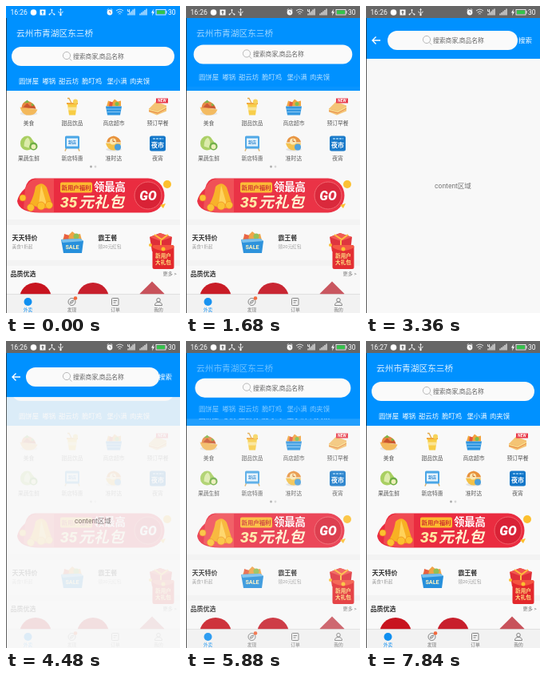
These frames come from a looping animation (218x384 px, 8 s). An HTML page:

```html
<!DOCTYPE html>
<html lang="zh-CN">
<head>
<meta charset="utf-8">
<title>Search transition</title>
<style>
  html, body { margin: 0; width: 100%; height: 100%; overflow: hidden; background: #fff; }
  svg { display: block; width: 100vw; height: 100vh; --p: 0; }
  text { font-family: Roboto, "Noto Sans CJK SC", "Noto Sans CJK", sans-serif; }
  .veil { opacity: calc(1.11 * var(--p) - .11); }
  .bar { height: calc(106px - 40px * var(--p)); }
  .title { opacity: calc(.88 - 2 * var(--p)); }
  .words { opacity: calc(.95 - 2 * var(--p)); transform: translateY(calc(-40px * var(--p))); }
  .lift { transform: translateY(calc(-20px * var(--p))); }
  .box { x: calc(7px + 20px * var(--p)); width: calc(204px - 41px * var(--p)); }
  .back { opacity: calc(2 * var(--p) - .6); }
  .go { opacity: calc(2 * var(--p) - .7); }
</style>
</head>
<body>
<svg id="stage" viewBox="0 0 218 384" preserveAspectRatio="none">
  <g id="home">
    <rect width="218" height="384" fill="#f9f9f9"/>
    <rect width="218" height="106" fill="#0091ff"/>
    <rect x="7" y="51" width="204" height="24" rx="12" fill="#fafafa"/>
    <g id="baseWords"></g>
    <g id="grid"></g>
    <circle cx="106.500" cy="201" r="1.400" fill="#a9a9a9"/><circle cx="112" cy="201" r="1.400" fill="#d5d5d5"/>

    <g id="banner">
      <path d="M36 215.500H178a20.500 21.500 0 0 1 0 43H42Q16 258 14 244 16 235 24 228 27 216 36 215.500z" fill="#ea2c40"/>
      <path d="M24 228q6-12 16-12h20v42H42q-12 0-20-5z" fill="#f04a52"/>
      <path d="M30 247q5-9 7-21 8-8 14 1l7 22q-10 9-28-2z" fill="#f8b023"/>
      <path d="M41 248l3-24 7 24z" fill="#ffd25a"/>
      <g fill="#fcc02f" stroke="#ee8a1c" stroke-width=".7">
        <circle cx="21" cy="240" r="4"/><circle cx="31" cy="252" r="4.500"/>
        <circle cx="44" cy="250" r="5"/><circle cx="54" cy="249" r="4.500"/>
      </g>
      <g fill="#fcc02f"><circle cx="202" cy="223" r="5"/><path d="M193 249l7-2-3 6z"/></g>
      <rect x="68" y="220.500" width="40" height="13" rx="2" fill="#fdba30"/>
      <circle cx="178" cy="237" r="17" fill="#d92236" stroke="#f2636c"/>
    </g>

    <rect y="267" width="218" height="7" fill="#f3f3f3"/>
    <rect y="318" width="218" height="7" fill="#f3f3f3"/>

    <g id="sale">
      <path d="M71 292l3-6 4 1 5-5 5 4 5-1 2 8z" fill="#f0a345"/>
      <path d="M73 285l6 2-1 6h-6z" fill="#e9603f"/>
      <circle cx="88" cy="288" r="3.500" fill="#8fbf57"/>
      <path d="M69 292l24-1 4 3-2 15H72z" fill="#2790dc"/>
      <path d="M69 292l24-1 4 3-26 2z" fill="#76c0ee"/>
    </g>
    <g id="stores">
      <circle cx="37" cy="366" r="20" fill="#c8141f"/>
      <circle cx="109" cy="366" r="20" fill="#c81f2c"/>
      <rect x="172" y="349" width="22" height="22" fill="#c8525b" transform="rotate(45 183 360)"/>
    </g>
    <g id="gift">
      <path d="M180 289l13-5 15 5-2 17-23 1z" fill="#df2f38"/>
      <path d="M180 289l13-5 15 5-14 5z" fill="#f1574f"/>
      <path d="M186 286l9 6 8-6M194 293v12" fill="none" stroke="#fdbe3c" stroke-width="2"/>
      <circle cx="181" cy="299" r="2" fill="#fcc02f"/>
      <rect x="183.500" y="299" width="27" height="30" rx="2.500" fill="#e3282c"/>
      <path d="M183.500 302q13.500 8 27 0v-1q0-2-2-2h-23q-2 0-2 2z" fill="#f4543f"/>
      <circle cx="197" cy="304" r="2.500" fill="#fcc02f"/>
    </g>
    <g id="tabs">
      <rect y="361" width="218" height="23" fill="#f2f2f2"/>
      <path d="M0 360.500h218" stroke="#dadada" stroke-width=".8"/>
      <circle cx="27.500" cy="370" r="5" fill="#0f8ff0"/>
      <g fill="none" stroke="#777" stroke-width=".9">
        <circle cx="82.500" cy="370" r="4.500"/><path d="M80.500 372l1-3 3-1-1 3z"/>
        <rect x="132.500" y="365.500" width="8.500" height="9" rx="1"/><path d="M134.500 368.500h4.500M134.500 371h3"/>
        <circle cx="191" cy="367.800" r="2.300"/><path d="M186.500 374.500q0-4 4.500-4t4.500 4z"/>
      </g>
      <circle cx="87" cy="365.500" r="2.300" fill="#f2683c"/>
    </g>
    <g id="copy"></g>
  </g>

  <g class="veil">
    <rect y="66" width="218" height="318" fill="#f8f8f8"/>
    <g id="content"></g>
  </g>

  <rect class="bar" width="218" fill="#0091ff"/>
  <g id="title" class="title"></g>
  <g id="words" class="words"></g>
  <g class="lift">
    <rect class="box" y="51" height="24" rx="12" fill="#fafafa"/>
    <g fill="none" stroke="#aaa" stroke-width=".8"><circle cx="76" cy="62" r="4.600"/><path d="M79.300 65.500l3 3"/></g>
    <g id="hint"></g>
    <path class="back" d="M18 63H8.500M12.500 58.500L8 63l4.500 4.500" fill="none" stroke="#fff" stroke-width="1.400"/>
    <g id="go" class="go"></g>
  </g>

  <g id="status">
    <rect id="statusBg" width="218" height="15"/>
    <g fill="#fff">
      <circle cx="34.500" cy="8" r="3.800"/>
      <path fill-rule="evenodd" d="M42.500 4.500h7v7h-7zM46 5.500l-2 2.500h1.300v2.500h1.400V8H48z"/>
      <circle cx="57.500" cy="5" r="1"/><circle cx="54.500" cy="10.500" r="1"/><circle cx="60.500" cy="10.500" r="1"/>
      <circle cx="68.500" cy="11" r="1.200"/><circle cx="130" cy="8" r="3.400"/>
      <path d="M185 3.500l-3 5h1.800l-.8 4 3-5.200h-1.800z"/>
      <path d="M200.500 6h1v3.500h-1z"/>
    </g>
    <g fill="none" stroke="#fff" stroke-width=".8">
      <path d="M57.500 5v3l-3 2.500M57.500 8l3 2.500"/>
      <path d="M68.500 11V3.500l-1 1.500M68.500 3.500l1 1.500M66 6.500v1.500l2.500 1.500L71 8V6.500"/>
      <path d="M126.500 5l2-1.500M133.500 5l-2-1.500"/><path d="M130 6v2l1.500 1" stroke="#666"/>
      <path d="M138 6q4.500-3.600 9 0M139.600 8q2.900-2.300 5.800 0M141.200 10q1.300-1 2.600 0"/>
      <path d="M153 11.500v-2M155 11.500v-3.500M157 11.500v-5M159 11.500v-7M161 11.500v-8M168 11.500v-2M170 11.500v-3.500M172 11.500v-5M174 11.500v-6.500M176 11.500v-8" stroke-width="1.100"/>
      <path d="M152.500 4v2.500h2.500M154.500 4v4"/>
      <rect x="188" y="4.500" width="12" height="6.500"/>
    </g>
    <rect x="189" y="5.500" width="10" height="4.500" fill="#35c44b"/>
    <g id="statusText"></g>
  </g>
  <path d="M.4 15V384" stroke="#222" stroke-width=".8"/>
</svg>
<script>
const $ = id => document.getElementById(id);

// cy is the optical middle of the glyphs
const label = (x, cy, size, str, fill, extra = '') =>
  `<text x="${x}" y="${(cy + size * .37).toFixed(2)}" font-size="${size}" fill="${fill}" ${extra}>${str}</text>`;
const mid = (x, cy, size, str, fill, extra = '') =>
  label(x, cy, size, str, fill, 'text-anchor="middle" ' + extra);

const bold = 'font-weight="700"';
const slant = 'font-weight="900" font-style="italic"';

const words = [[16, '圆饼屋'], [45.5, '嘟锅'], [66, '甜云坊'], [95, '脆叮鸡'], [126.5, '堡小满'], [155, '肉夹馍']]
  .map(([x, s]) => label(x, 93.5, 8.4, s, '#fff')).join('');
$('baseWords').innerHTML = $('words').innerHTML = words;
$('title').innerHTML = label(13, 34, 10.7, '云州市青湖区东三桥', '#fff', 'font-weight="300"');
$('hint').innerHTML = label(84, 63, 7.8, '搜索商家,商品名称', '#666');
$('go').innerHTML = label(191, 63, 8.5, '搜索', '#fff');
$('content').innerHTML = mid(109, 225, 8.5, 'content区域', '#777');

// Category icons, drawn around 0,0
const icons = [
  ['美食', `<ellipse cy="8" rx="11" ry="2.500" fill="#e6e6e6"/><path d="M-11 0l22 3q-3 7-9 7h-5q-6-2-8-10z" fill="#f3b95c"/>
    <path d="M-9 1q0-7 7-9 9 2 11 10z" fill="#e8873e"/><path d="M-7 0l5-5 4 4 4-2 3 5z" fill="#c9552f"/><path d="M-6-5l4-4 3 3zM3-5l4 2-3 2z" fill="#79b84a"/>`],
  ['甜品饮品', `<path d="M-6-4H6L4 10h-8z" fill="#f8cd45"/><path d="M-5.500 0h11L5 4H-5z" fill="#fbe596"/>
    <path d="M-7-5.500H7v2H-7z" fill="#f3a93a"/><path d="M-1-5l-3-6h-2" fill="none" stroke="#e2a745" stroke-width="1.300"/><circle cx="4" cy="-7" r="3" fill="#f6d35a"/>`],
  ['商店超市', `<path d="M-9-1l2-7 5 2 3-4 4 3 4-1v7z" fill="#f2a33c"/><path d="M-5-7l4 1-1 5h-4z" fill="#e2543e"/><circle cx="4" cy="-4" r="2.500" fill="#7dbd4c"/>
    <path d="M-10-1h20L8 10H-8z" fill="#2e95e0"/><path d="M-9 2.500H9M-8.500 6H8.500" stroke="#8ecaf3"/>`],
  ['预订早餐', `<path d="M-11 2l9-9 13 5v7l-12 5-10-4z" fill="#f4c474"/><path d="M-11 2l11 3 11-6v3L0 8l-11-3z" fill="#e98a4a"/>
    <path d="M-11 3l11 3 11-6" fill="none" stroke="#f8e08c" stroke-width="1.500"/><path d="M-2-11h15v6H-2z" fill="#e8394a"/>` + mid(5.5, -8, 4.8, 'NEW', '#fff', bold)],
  ['果蔬生鲜', `<path d="M-10 4q-2-8 4-12 7-3 10 3 6 6 0 12-9 5-14-3z" fill="#a9cf62"/><path d="M-6 4q0-9 5-11 5 5 1 13z" fill="#dcebaa"/>
    <circle cx="6" cy="4" r="5" fill="#6fae45"/><circle cx="6" cy="4.500" r="3" fill="#eef0b8"/>`],
  ['新店特惠', `<path d="M-7 5l-2 5M7 5l2 5" stroke="#d9b06a" stroke-width="1.500"/><rect x="-9" y="-9" width="18" height="16" rx="1.500" fill="#4aa6e6"/>
    <rect x="-7" y="-6" width="14" height="10" fill="#e4f3fd"/>` + mid(0, -1, 5, '新店', '#2b85cf', bold)],
  ['准时达', `<ellipse cy="8" rx="10" ry="2" fill="#e3e3e3"/><path d="M-10 0H9q-1 9-9 9t-10-9z" fill="#f3c148"/><path d="M-9-1q1-7 9-8 8 2 9 8z" fill="#e8923c"/>
    <circle cx="-1" cy="-2" r="4" fill="#fbe7b0"/><path d="M-1-5v3h2.500" fill="none" stroke="#c96a32"/><circle cx="5" cy="5" r="4" fill="#4a9fdc"/>`],
  ['夜宵', `<rect x="-10" y="-9" width="20" height="19" rx="2.500" fill="#1377c9"/><path d="M-6-5.500H7" stroke="#9bd1f6" stroke-width="1.500" stroke-dasharray="3 1"/>` + mid(0, 3, 8, '夜市', '#fff', bold)],
];
const cols = [28.5, 83, 135, 190];
$('grid').innerHTML = icons.map(([name, art], i) => {
  const x = cols[i % 4], row = i >> 2;
  return `<g transform="translate(${x} ${126.5 + row * 45})">${art}</g>` + mid(x, 146.5 + row * 44, 6.8, name, '#555');
}).join('');

$('copy').innerHTML = [
  mid(88, 227, 7.4, '新用户福利', '#d0342c', bold),
  label(110, 226, 13.3, '领最高', '#fff', bold),
  label(68, 245, 19, '35', '#ffe9a0', slant),
  label(91, 245, 19, '元礼包', '#fff3d0', slant),
  mid(178, 237, 16, 'GO', '#fff', slant),
  label(7.5, 290.5, 8, '天天特价', '#333', bold),
  label(7.5, 300.5, 5.7, '美食1折起', '#999'),
  label(115.3, 290.5, 8, '霸王餐', '#333', bold),
  label(115.3, 300.5, 5.7, '领20元红包', '#999'),
  mid(83, 301.5, 7.2, 'SALE', '#fff3c0', bold),
  mid(197, 312.5, 6.6, '新用户', '#ffdf80', bold),
  mid(197, 321, 6.6, '大礼包', '#ffdf80', bold),
  label(5.5, 335, 8, '品质优选', '#333', bold),
  label(196.5, 335, 6.2, '更多 &gt;', '#777'),
  mid(27.5, 380, 5.8, '外卖', '#0f8ff0'),
  mid(82.5, 380, 5.8, '发现', '#777'),
  mid(137, 380, 5.8, '订单', '#777'),
  mid(191, 380, 5.8, '我的', '#777'),
].join('');

$('statusText').innerHTML =
  label(5.5, 8, 8.6, '16:26', '#fff', 'id="clock"') + label(203, 8, 8.6, '30', '#fff');

const LOOP = 8000, STEP = 280;
const clamp = v => Math.min(1, Math.max(0, v));
// 0 on the home screen, 1 on the search screen
const progress = t => t < 4000 ? clamp((t - 1440) / 1880) : clamp((6330 - t) / 2060);

function draw(now) {
  const t = Math.floor(now % LOOP / STEP) * STEP;
  $('stage').style.setProperty('--p', progress(t));
  $('statusBg').setAttribute('fill', t < 1400 ? '#0091ff' : '#666');
  $('clock').textContent = t < 7000 ? '16:26' : '16:27';
}

const start = performance.now();
function tick() {
  draw(performance.now() - start);
  requestAnimationFrame(tick);
}
tick();
</script>
</body>
</html>
```
